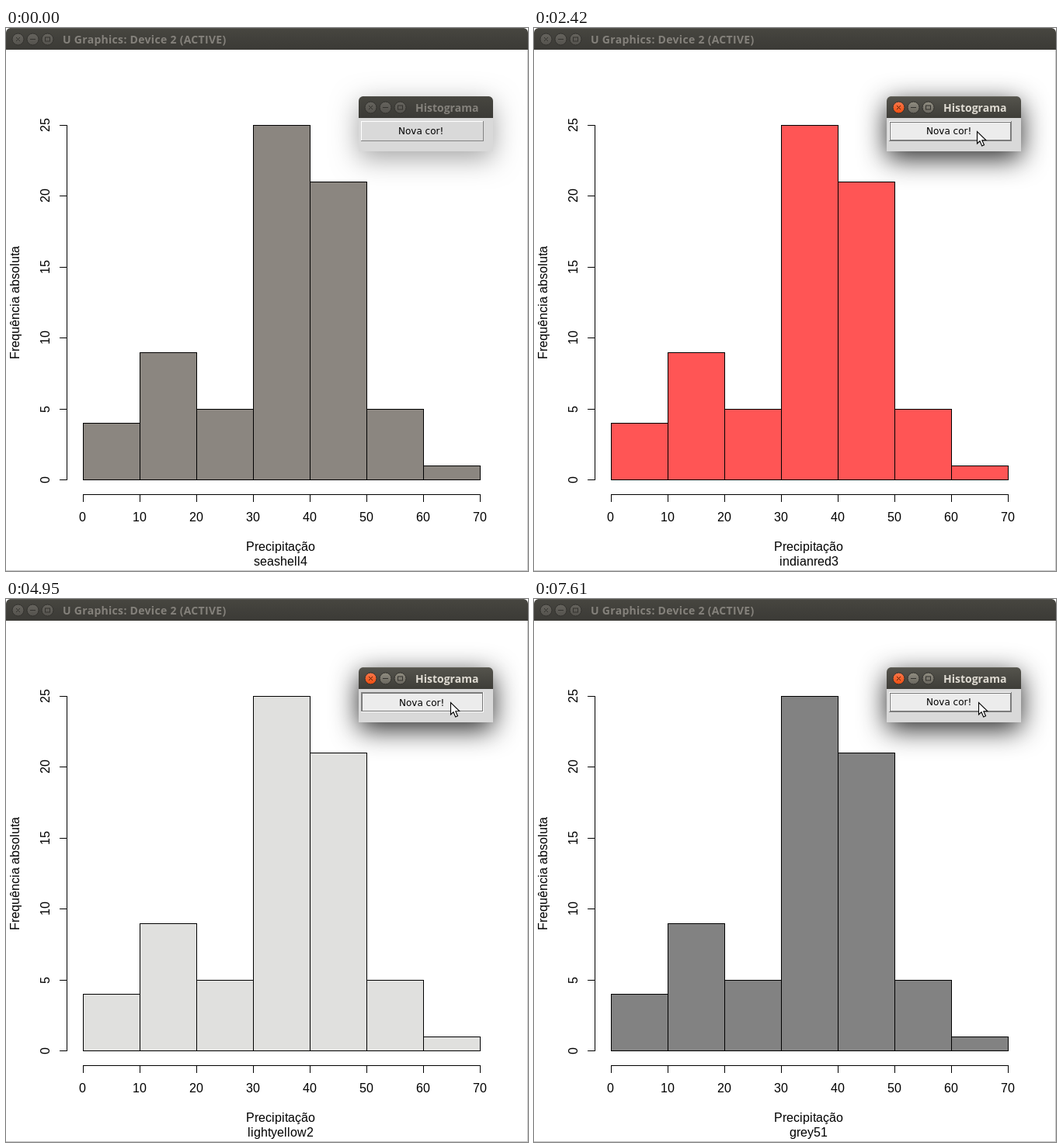
An HTML page with a canvas for the animation above (7820 ms loop, 672x700 px).

```html
<!DOCTYPE html>
<html lang="pt">
<head>
<meta charset="utf-8">
<title>Histograma</title>
<style>
html, body { margin: 0; width: 100%; height: 100%; overflow: hidden; background: #fff; }
canvas { display: block; width: 672px; height: 700px; }
</style>
</head>
<body>
<canvas id="stage" width="672" height="700"></canvas>
<script>
const ctx = document.getElementById('stage').getContext('2d');
const LOOP = 7820;
const PLOT_FONT = '16px "Liberation Sans", Arial, sans-serif';
const TITLE_FONT = '700 14px "Open Sans", "Noto Sans", sans-serif';
const COUNTS = [4, 9, 5, 25, 21, 5, 1];

// [time, label, fill]
const COLORS = [
  [0, 'seashell4', '#8b8680'],
  [1730, 'blue', '#224ba8'],
  [2420, 'indianred3', '#ff5555'],
  [2990, 'lightsteelblue4', '#224ba8'],
  [3730, 'gray64', '#a3a3a3'],
  [4410, 'lightyellow2', '#e0e0de'],
  [5010, 'gray47', '#787878'],
  [5610, 'grey6', '#0d0d0d'],
  [6210, 'gray55', '#8c8c8c'],
  [6950, 'gray38', '#616161'],
  [7610, 'grey51', '#828282']
];
// [press, release]
const CLICKS = [[1580, 1730], [2280, 2420], [2880, 2990], [3600, 3730], [4330, 4410],
  [4950, 5010], [5540, 5610], [6130, 6210], [6840, 6950], [7540, 7610]];
// [start, end, steps, from, to]
const MOVES = [
  [860, 1060, 4, [659, 212], [552, 108]],
  [1240, 1400, 4, [551, 113], [549, 131]],
  [1820, 2020, 5, [553, 131], [570, 133]],
  [3270, 3310, 2, [571, 133], [572, 133]]
];

const snap = v => Math.floor(v + 0.05) + 0.5;
const xAt = v => snap(99.16 + v * 7.301);
const yAt = v => snap(582.77 - v * 18.31);

function pointer(t) {
  let pos = null;
  for (const [start, end, steps, a, b] of MOVES) {
    if (t < start) break;
    const n = steps - 1;
    const k = Math.min(n, Math.floor((t - start) / (end - start) * n + 1e-6)) / n;
    pos = a.map((v, i) => Math.round(v + (b[i] - v) * k));
  }
  return pos;
}

function line(x1, y1, x2, y2, color = '#000') {
  ctx.strokeStyle = color;
  ctx.lineWidth = 1;
  ctx.beginPath();
  ctx.moveTo(x1, y1);
  ctx.lineTo(x2, y2);
  ctx.stroke();
}

function text(str, x, y, font, color) {
  ctx.font = font;
  ctx.fillStyle = color;
  ctx.fillText(str, x, y);
}

// Centred plot text with whole-pixel advances, as hinted text is set.
function plotText(str, x, y, turned) {
  ctx.save();
  ctx.translate(x, y);
  if (turned) ctx.rotate(-Math.PI / 2);
  ctx.font = PLOT_FONT;
  ctx.fillStyle = '#000';
  const widths = [...str].map(c => Math.round(ctx.measureText(c).width));
  let pen = -Math.round(widths.reduce((a, b) => a + b) / 2);
  [...str].forEach((c, i) => {
    ctx.fillText(c, pen, 0);
    pen += widths[i];
  });
  ctx.restore();
}

function topRounded(x, y, w, h, r) {
  ctx.beginPath();
  ctx.roundRect(x, y, w, h, [r, r, 0, 0]);
}

function windowButton(x, y, kind, active) {
  const hot = active && kind === 0;
  const g = ctx.createLinearGradient(0, y - 7, 0, y + 7);
  g.addColorStop(0, hot ? '#f8764a' : active ? '#8f8c80' : '#65635d');
  g.addColorStop(1, hot ? '#ee4f12' : active ? '#6a675f' : '#55534e');
  ctx.beginPath();
  ctx.arc(x, y, 7.5, 0, 7);
  ctx.fillStyle = g;
  ctx.fill();
  ctx.strokeStyle = '#33322e';
  ctx.lineWidth = 1;
  ctx.stroke();
  const ink = hot ? '#5a1f08' : '#34332f';
  ctx.lineWidth = 1;
  if (kind === 0) {
    line(x - 2.5, y - 2.5, x + 2.5, y + 2.5, ink);
    line(x - 2.5, y + 2.5, x + 2.5, y - 2.5, ink);
  } else if (kind === 1) {
    line(x - 3.5, y, x + 3.5, y, ink);
  } else {
    ctx.strokeStyle = ink;
    ctx.strokeRect(x - 3, y - 2.5, 6, 5);
  }
}

function titleBar(x, y, w, title, spacing, active) {
  const g = ctx.createLinearGradient(0, y, 0, y + 28);
  g.addColorStop(0, active ? '#55544d' : '#474640');
  g.addColorStop(1, active ? '#3e3d38' : '#3b3a36');
  topRounded(x, y, w, 28, 6);
  ctx.fillStyle = g;
  ctx.fill();
  line(x + 5, y + 0.5, x + w - 5, y + 0.5, active ? '#68675f' : '#53524c');
  for (let i = 0; i < 3; i++) windowButton(x + 15.5 + 19 * i, y + 14.5, i, active);
  ctx.letterSpacing = spacing + 'px';
  text(title, x + 73, y + 20, TITLE_FONT, active ? '#dfdbd2' : '#84817b');
  ctx.letterSpacing = '0px';
}

function plot(label, fill) {
  COUNTS.forEach((n, i) => {
    const x = xAt(i * 10), y = yAt(n);
    const w = xAt(i * 10 + 10) - x, h = yAt(0) - y;
    ctx.fillStyle = fill;
    ctx.fillRect(x, y, w, h);
    ctx.strokeStyle = '#000';
    ctx.lineWidth = 1;
    ctx.strokeRect(x, y, w, h);
  });
  line(99, 601.5, 611, 601.5);
  for (let v = 0; v <= 70; v += 10) {
    line(xAt(v), 601, xAt(v), 611);
    plotText(String(v), Math.floor(xAt(v)), 636);
  }
  line(78.5, 125, 78.5, 583);
  for (let v = 0; v <= 25; v += 5) {
    line(69, yAt(v), 79, yAt(v));
    plotText(String(v), 56, Math.floor(yAt(v)), true);
  }
  plotText('Frequência absoluta', 17, 354, true);
  plotText('Precipitação', 354, 674);
  plotText(label, 354, 693);
}

function button(hover, focus, pressed) {
  ctx.fillStyle = hover ? '#ececec' : '#d9d9d9';
  ctx.fillRect(457, 120, 158, 26);
  const light = pressed ? '#828282' : '#fff';
  const dark = pressed ? '#fff' : '#828282';
  line(457, 120.5, 615, 120.5, light);
  line(457.5, 120, 457.5, 146, light);
  line(457, 145.5, 615, 145.5, dark);
  line(614.5, 120, 614.5, 146, dark);
  if (focus) {
    ctx.strokeStyle = '#000';
    ctx.setLineDash([1, 1]);
    ctx.strokeRect(458.5, 121.5, 155, 23);
    ctx.setLineDash([]);
  }
  const d = pressed ? 1 : 0;
  text('Nova cor!', 505 + d, 137 + d, '12px "DejaVu Sans", sans-serif', '#000');
}

function dialog(active, hover, pressed) {
  ctx.save();
  ctx.shadowColor = `rgba(0,0,0,${active ? 0.85 : 0.36})`;
  ctx.shadowBlur = 34;
  ctx.shadowOffsetY = 9;
  topRounded(454, 88, 173, 71, 6);
  ctx.fillStyle = '#d9d9d9';
  ctx.fill();
  ctx.restore();
  titleBar(454, 88, 173, 'Histograma', 0, active);
  button(hover, active, pressed);
}

function arrow([x, y]) {
  const shape = [[0.5, 0.5], [0.5, 16], [4, 12.8], [6.7, 19], [9.5, 17.8], [6.8, 11.8], [11.8, 11.5]];
  ctx.beginPath();
  shape.forEach(([a, b]) => ctx.lineTo(x + a, y + b));
  ctx.closePath();
  ctx.fillStyle = '#fff';
  ctx.fill();
  ctx.strokeStyle = '#000';
  ctx.lineWidth = 1.1;
  ctx.stroke();
}

function draw(t) {
  const [, label, fill] = COLORS.filter(c => c[0] <= t).pop();
  const pos = pointer(t);
  const hover = !!pos && pos[0] >= 457 && pos[0] < 615 && pos[1] >= 116 && pos[1] < 146;
  const pressed = CLICKS.some(([a, b]) => t >= a && t < b);

  ctx.fillStyle = '#fff';
  ctx.fillRect(0, 0, 672, 700);
  plot(label, fill);
  line(671.5, 28, 671.5, 700, '#c4c4c4');
  line(0, 699.5, 672, 699.5, '#c4c4c4');
  titleBar(0, 0, 672, 'U Graphics: Device 2 (ACTIVE)', 0.3, false);
  dialog(t >= CLICKS[0][0], hover, pressed);
  if (pos) arrow(pos);
}

const began = performance.now();
function tick() {
  draw((performance.now() - began) % LOOP);
  requestAnimationFrame(tick);
}
tick();
</script>
</body>
</html>
```
